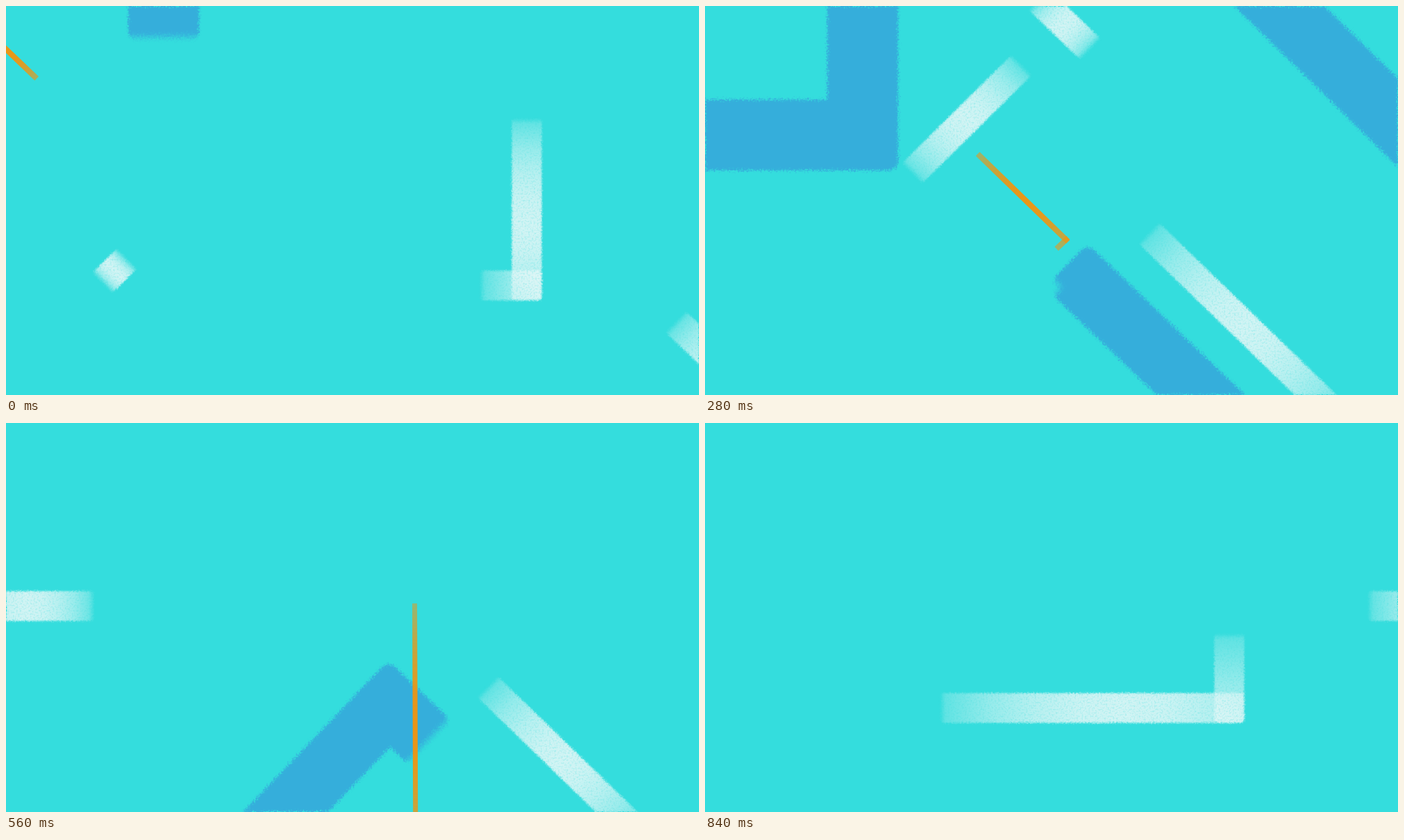
Write an HTML page with a canvas that moves like this. It is 998 px wide and 561 px high and loops after 880 ms.

```html
<!DOCTYPE html>
<html lang="en">
<head>
<meta charset="utf-8">
<title>Brush strokes</title>
<style>
  html, body { margin: 0; width: 998px; height: 561px; overflow: hidden; background: #34dddd; }
  canvas, svg { position: absolute; left: 0; top: 0; }
  #blue { filter: url(#chalk); }
  #white { filter: url(#grain); }
</style>
</head>
<body>
<svg width="0" height="0" color-interpolation-filters="sRGB">
  <filter id="chalk" x="0" y="0" width="1" height="1">
    <feTurbulence type="fractalNoise" baseFrequency=".4" numOctaves="2" seed="4" result="noise"/>
    <feGaussianBlur in="SourceGraphic" stdDeviation="1.5"/>
    <feDisplacementMap in2="noise" scale="11" xChannelSelector="R" yChannelSelector="G"/>
  </filter>
  <filter id="grain" x="0" y="0" width="1" height="1">
    <feTurbulence type="fractalNoise" baseFrequency=".4" numOctaves="2" seed="7" result="noise"/>
    <feColorMatrix in="noise" values="0 0 0 0 0  0 0 0 0 0  0 0 0 0 0  0 0 0 .7 .62" result="paper"/>
    <feGaussianBlur in="SourceGraphic" stdDeviation="1"/>
    <feDisplacementMap in2="noise" scale="4" xChannelSelector="R" yChannelSelector="G"/>
    <feComposite in2="paper" operator="in"/>
  </filter>
</svg>
<script>
const WIDTH = 998, HEIGHT = 561, STEP = 40, STEPS = 22;
const strokes = [];

// floor and peak are the opacities at the ends and in the middle of a stroke.
function makeLayer(id, rgb, style) {
  const canvas = document.createElement('canvas');
  Object.assign(canvas, { id, width: WIDTH, height: HEIGHT });
  document.body.append(canvas);
  return { ctx: canvas.getContext('2d'), rgb, ...style };
}
const blue = makeLayer('blue', '53,174,219', { floor: 1, peak: 1, soft: 12, radius: 14 });
const white = makeLayer('white', '234,247,247', { floor: .25, peak: .87, soft: 8, radius: 5 });
const orange = makeLayer('orange', '240,148,16', { floor: .5, peak: .97, soft: 1, radius: 1 });
const layers = [blue, white, orange];

// The head and the tail each run the whole path between two times, given in steps.
function stroke(layer, width, points, head, tail, power = 1) {
  let end = 0;
  const legs = points.slice(1).map(([x2, y2], i) => {
    const [x, y] = points[i], start = end;
    end += Math.hypot(x2 - x, y2 - y);
    return { x, y, angle: Math.atan2(y2 - y, x2 - x), start, end };
  });
  strokes.push({ layer, width, legs, head, tail, power });
}

stroke(blue, 102, [[227, -60], [227, 186], [-300, 186]], [-2.9, 10], [6.5, 13.2]);
stroke(blue, 91, [[758, -68], [1098, 267]], [4.3, 7], [8, 14.8]);
stroke(blue, 88, [[790, 634], [552, 405], [300, 668]], [-.2, 13], [11, 19]);

const diagonal = [[415, 110], [930, 610]];
stroke(white, 42, diagonal, [3, 7.1], [4.55, 10.2]);
stroke(white, 42, diagonal, [8.7, 14.2], [9.9, 17.5]);
stroke(white, 41, [[138, 400], [640, -97]], [-3.6, 9.7], [3, 10.1], 2);
stroke(white, 42, [[1115, 600], [480, -10]], [-2, 6.4], [.35, 7.9]);
stroke(white, 43, [[-250, 264], [1250, 264]], [13.6, 19], [13.8, 24.7], .53);
stroke(white, 43, [[187, -100], [187, 411], [755, 411], [755, -60]], [15.8, 22.8], [16.4, 27.3]);
stroke(white, 43, [[600, 403], [750, 403], [750, -80]], [-3, 1], [-1.2, 3.2]);

stroke(orange, 8, [[-40, 24], [403, 448], [520, 337], [342, 164], [480, 33], [400, -45]],
  [-.95, 12], [1.7, 13.3], 1.25);
stroke(orange, 7, [[1040, 122], [588, 122], [590, 640]], [7.4, 14.1], [9, 16.9]);

// Every leg of a path takes an equal share of the progress.
function distance(legs, [from, to], power, step) {
  const time = Math.min(1, Math.max(0, (step - from) / (to - from)));
  const progress = time ** power * legs.length;
  const index = Math.min(legs.length - 1, Math.floor(progress));
  const { start, end } = legs[index];
  return start + (end - start) * (progress - index);
}

function drawStroke({ layer, width, legs, head: headTimes, tail: tailTimes, power }, step) {
  const { ctx, rgb, floor, peak, soft, radius } = layer;
  const head = distance(legs, headTimes, power, step);
  const tail = distance(legs, tailTimes, power, step);
  const length = head - tail;
  if (length < 1) return;
  const fade = Math.min(.4, soft / length);
  // Short strokes are more evenly covered.
  const low = floor + (peak - floor) * .8 * Math.exp(-length / 100);

  for (const { x, y, angle, start, end } of legs) {
    if (head <= start || tail >= end) continue;
    // Legs overrun a corner by half the brush width.
    const from = Math.max(tail, start - width / 2) - start;
    const to = Math.min(head, end + width / 2) - start;
    const paint = ctx.createLinearGradient(tail - start, 0, head - start, 0);
    const stop = (at, alpha) => paint.addColorStop(at, `rgba(${rgb},${alpha})`);
    stop(0, 0);
    for (let u = 0; u <= 1; u += .125) {
      const cover = Math.abs(Math.sin(Math.PI * u)) ** .8;
      stop(fade + (1 - 2 * fade) * u, low + (peak - low) * cover);
    }
    stop(1, 0);

    ctx.save();
    ctx.translate(x, y);
    ctx.rotate(angle);
    ctx.fillStyle = paint;
    ctx.beginPath();
    ctx.roundRect(from, -width / 2, to - from, width, radius);
    ctx.fill();
    ctx.restore();
  }
}

function render() {
  const step = Math.floor(performance.now() / STEP) % STEPS;
  layers.forEach(({ ctx }) => ctx.clearRect(0, 0, WIDTH, HEIGHT));
  strokes.forEach(item => drawStroke(item, step));
  requestAnimationFrame(render);
}
render();
</script>
</body>
</html>
```
